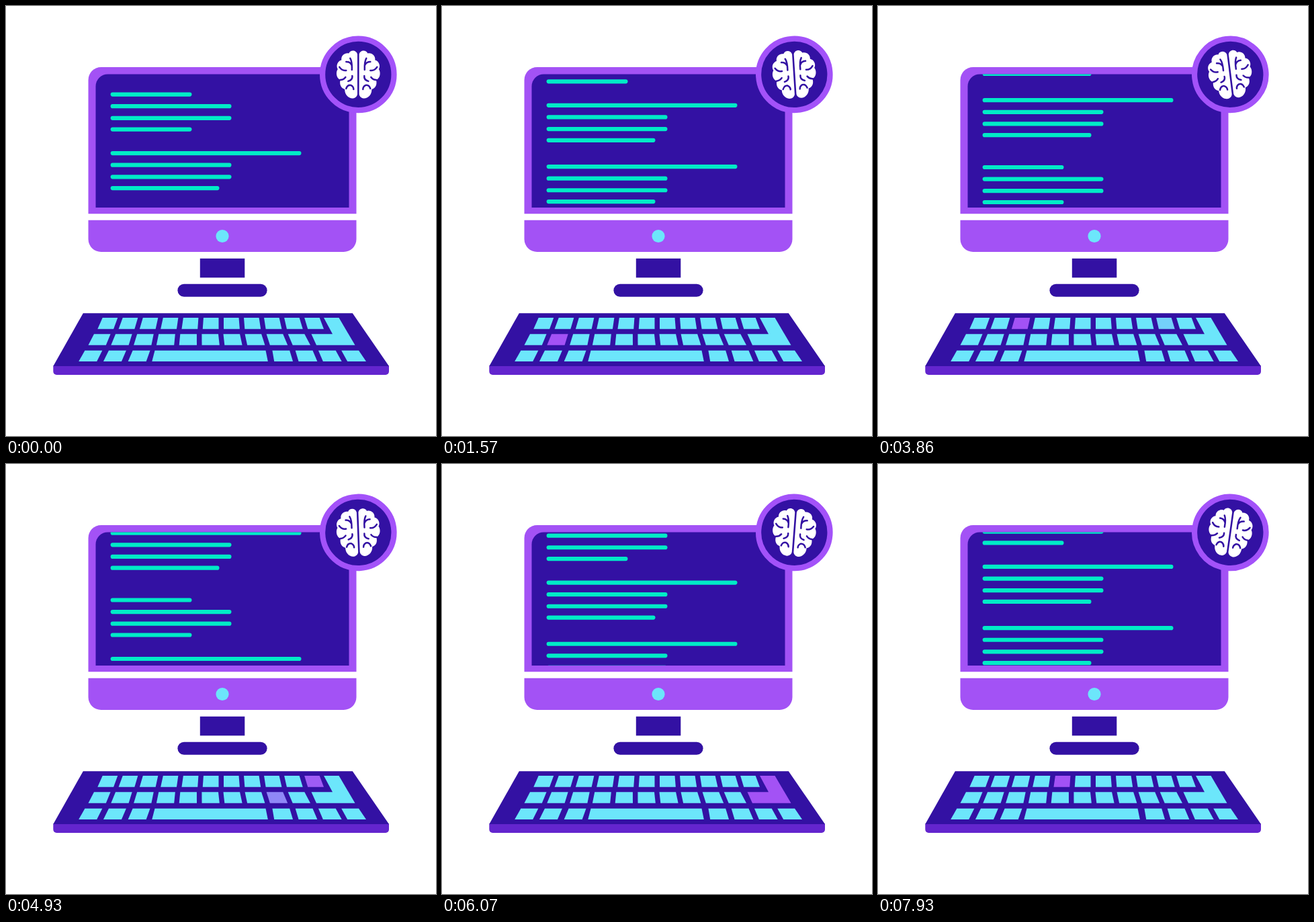
An HTML page for the animation above (8000 ms loop, 640 by 640 pixels).

```html
<!DOCTYPE html>
<html lang="en">
<head>
<meta charset="utf-8">
<title>Coding computer</title>
<style>
  html, body { margin: 0; width: 100%; height: 100%; overflow: hidden; background: #fff; }
  svg { display: block; width: 100vw; height: 100vh; }
</style>
</head>
<body>
<svg viewBox="0 0 640 640">
  <defs>
    <clipPath id="screen"><path d="M133.5 300V119.5a18 18 0 0 1 18-18H510.5V300Z"/></clipPath>
    <g id="half">
      <path fill="#fff" d="M-1.3-30C-2.5-36.5-11.500-37.500-14-31.500C-20-33-26-28-25-21.500C-31-20-33.500-12.500-30.500-8C-34-3-32.500 6-26.500 8C-28.500 14-26 20.500-20 22C-20.500 30-14 36-8 35.500C-4 35-1.500 32-1.300 29Z"/>
      <path fill="none" stroke="#3311a3" stroke-width="2.5" stroke-linecap="round" d="M-12-24q3 5 2.500 17M-18-19q6 0 8 5M-28-11q4 6 10 5M-27 8q5 0 8-4M-9 2q1 6-6 8M-18 21q2-6 7-5q4 2 4 6"/>
    </g>
  </defs>

  <path fill="#a352f5" d="M122.500 309.200V110a19 19 0 0 1 19-19H502.500a19 19 0 0 1 19 19V309.200Z"/>
  <g clip-path="url(#screen)">
    <rect x="133" y="101" width="378" height="200" fill="#3311a3"/>
    <g id="code" stroke="#00ebc7" stroke-width="6.200" stroke-linecap="round"></g>
  </g>
  <path fill="#a352f5" d="M122.500 318.800H521.500V347a19 19 0 0 1-19 19H141.500a19 19 0 0 1-19-19Z"/>
  <circle cx="322" cy="342.500" r="9.600" fill="#6ce6fb"/>
  <rect x="288.800" y="375.800" width="66.500" height="28.500" fill="#3311a3"/>
  <rect x="255.400" y="413.800" width="133.200" height="19" rx="9.500" fill="#3311a3"/>

  <path fill="#6325ce" d="M70.300 535.500H570V544a5 5 0 0 1-5 5H75.300a5 5 0 0 1-5-5Z"/>
  <path fill="#3311a3" d="M114.800 457.200H515.800L570 536H70.300Z"/>
  <g id="keys"></g>

  <g id="badge">
    <circle r="53.200" fill="#3311a3" stroke="#a352f9" stroke-width="8.200"/>
    <use href="#half"/>
    <use href="#half" transform="scale(-1 1)"/>
  </g>
</svg>
<script>
const LOOP = 8000;
const NS = 'http://www.w3.org/2000/svg';
const byId = id => document.getElementById(id);
const clamp = x => Math.max(0, Math.min(1, x));

function add(parent, tag, attrs) {
  const el = document.createElementNS(NS, tag);
  for (const k in attrs) el.setAttribute(k, attrs[k]);
  parent.append(el);
  return el;
}

// Code: blocks of four lines, one short block and two long ones in turn
const code = byId('code');
const SHORT = [276, 335, 335, 276], LONG = [439, 335, 335, 317];
for (let block = 0, y = 132; block < 9; block++) {
  const isShort = block % 3 === 0;
  (isShort ? SHORT : LONG).forEach((end, i) => {
    const at = y + Math.min(17.6 * i, 52);
    add(code, 'line', { x1: 158.7, x2: end - 2.6, y1: at, y2: at });
  });
  y += isShort ? 87.5 : block % 3 === 1 ? 91.2 : 99.8;
}

// Keyboard: each row splits a trapezoid into equal keys
const LAYOUT = 'qwertyuiop[asdfghjkl;\nzxc vbnm';
const keys = [];
const addKey = points => keys.push(add(byId('keys'), 'polygon', { points }));

function addRow(count, gap, y1, y2, topL, topR, lowL, lowR) {
  const top = (topR - topL + gap) / count, low = (lowR - lowL + gap) / count;
  for (let i = 0; i < count; i++) {
    const a = topL + top * i, b = lowL + low * i;
    addKey([a, y1, a + top - gap, y1, b + low - gap, y2, b, y2].join(' '));
  }
}
addRow(11, 7.5, 464, 480.8, 143.7, 466.7, 136.3, 473);
addRow(10, 7.5, 488.2, 504.8, 131, 444.3, 122.5, 453);
addKey('473 464 495.500 464 519.500 504.800 462 504.800 454.500 488.200 486 488.200');
addRow(3, 9.7, 512.8, 529, 117.4, 214.5, 108.2, 208.7);
addRow(1, 0, 512.8, 529, 221.5, 386.5, 217.3, 389.8);
addRow(4, 8.5, 512.8, 529, 396.4, 525, 399.2, 536);

// Typing: one key per beat
const TYPED = 'udojsyhz[cieprl[gu\nncoszt';
const BEAT = 320, PRESS = 540, FADE = 140;
const CYAN = [108, 230, 251], PURPLE = [163, 82, 245];

function keyGlow(key, t) {
  let glow = 0;
  [...TYPED].forEach((char, n) => {
    const dt = t - n * BEAT;
    if (char === LAYOUT[key]) glow = Math.max(glow, clamp(Math.min(dt, PRESS - dt) / FADE));
  });
  return glow;
}

const smooth = u => u * u * (3 - 2 * u);
const quart = u => u < 0.5 ? 8 * u ** 4 : 1 - 8 * (1 - u) ** 4;

// Equal eased steps, each starting as the one before settles
function scroll(t) {
  let y = 0;
  for (let n = 0; n < 3; n++) y += 169.3 * quart(clamp((t + 587 - 3668 * n) / 4500));
  return y;
}

// Lean left, then swing over to the right
const tilt = t => -8 * smooth(clamp(t / 3300)) + 16 * smooth(clamp((t - 3300) / 4000));

function draw(t) {
  code.setAttribute('transform', `translate(0 ${-scroll(t)})`);
  byId('badge').setAttribute('transform', `translate(524.3 101.9) rotate(${tilt(t)})`);
  keys.forEach((el, i) => {
    const glow = keyGlow(i, t);
    const rgb = CYAN.map((c, n) => Math.round(c + (PURPLE[n] - c) * glow));
    el.setAttribute('fill', `rgb(${rgb})`);
  });
}

const begin = performance.now();
function tick() {
  draw((performance.now() - begin) % LOOP);
  requestAnimationFrame(tick);
}
tick();
</script>
</body>
</html>
```
